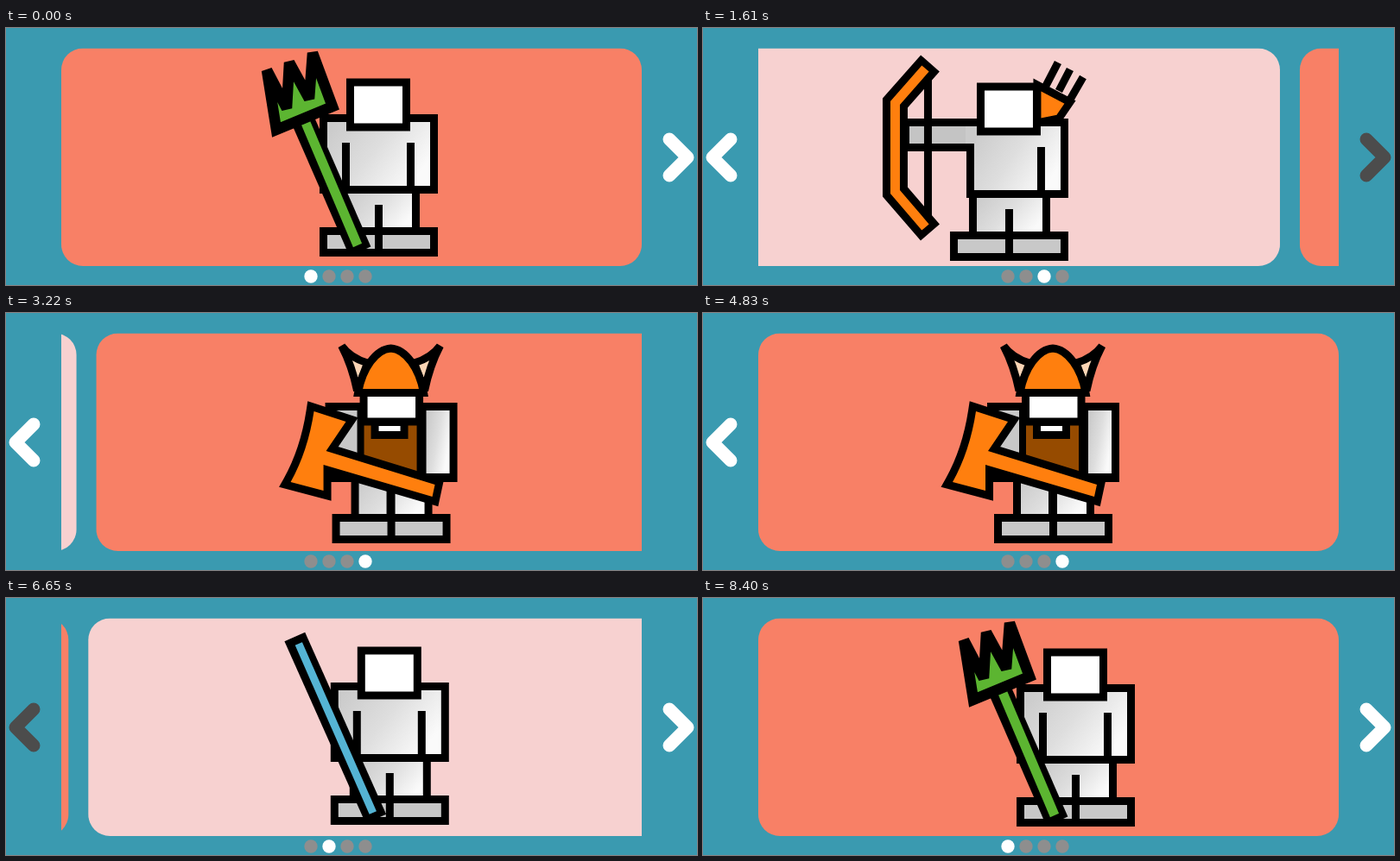
Recreate the animation shown at these times as an HTML page. Size 800 px wide and 298 px high, loop 8.47 s.

```html
<!DOCTYPE html>
<html lang="en">
<head>
<meta charset="utf-8">
<title>Character carousel</title>
<style>
  html, body { margin: 0; width: 100%; height: 100%; overflow: hidden; background: #3a9ab0; }
  svg { display: block; width: 800px; height: 298px; }
  .ink { fill: none; stroke: #000; stroke-width: 9; }
  .skin { fill: url(#steel); stroke: #000; stroke-width: 9; }
  .white { fill: #fff; stroke: #000; stroke-width: 9; }
  .arrow { fill: none; stroke-width: 15; stroke-linecap: round; stroke-linejoin: round; }
</style>
</head>
<body>
<svg viewBox="0 0 800 298">
  <defs>
    <linearGradient id="steel" x2="1" y2=".5">
      <stop offset=".1" stop-color="#cbcbcb"/>
      <stop offset=".55" stop-color="#dedede"/>
      <stop offset="1" stop-color="#fafafa"/>
    </linearGradient>
    <clipPath id="view"><path d="M64 23.500H736V276H64Z"/></clipPath>
    <g id="legs">
      <path class="skin" d="M389.5 187.5H474.5V236H389.5Z"/>
      <path d="M367.5 235.5H495.5V260.5H367.5Z" fill="#c8c8c8" stroke="#000" stroke-width="9"/>
      <path class="ink" d="M431.5 205V260"/>
    </g>
    <path id="head" class="white" d="M398.5 63H463.5V115H398.5Z"/>
    <g id="body">
      <use href="#legs"/>
      <path class="skin" d="M367.5 104.5H495.5V187.5H367.5Z"/>
      <path class="ink" d="M393.5 133V187M468.5 133V187"/>
      <use href="#head"/>
    </g>
    <path id="horn" d="M348 38Q358 52 378 58L366 90Q360 61 348 38Z"
          fill="#fbd5b5" stroke="#000" stroke-width="9" stroke-linejoin="bevel"/>
  </defs>

  <g clip-path="url(#view)">
    <g class="slide">
      <use href="#body"/>
      <path d="M342 103L410 259" stroke="#000" stroke-width="27"/>
      <path d="M347 110L407 252" stroke="#5cb531" stroke-width="11"/>
      <path d="M302 49L313 118L378 91L355 29L351 82L328 40L325 93Z"
            fill="#5cb531" stroke="#000" stroke-width="12.500" stroke-miterlimit="2"/>
    </g>

    <g class="slide">
      <path class="ink" d="M465 67L479 40M480 73L493 48M493 83L508 57"/>
      <path d="M455 66L493 86L480 105L455 110Z" fill="#ff7f0e" stroke="#000" stroke-width="9"/>
      <use href="#legs" x="-9" y="5"/>
      <path d="M302.5 109.5H400V138.5H302.5Z" fill="#c4c4c4" stroke="#000" stroke-width="9"/>
      <path class="skin" d="M377.5 109.5H486.5V192.5H377.5Z"/>
      <path d="M372 114H384V134H372Z" fill="#cbcbcb"/>
      <path class="ink" d="M459.5 138V192"/>
      <use href="#head" x="-9" y="5"/>
      <path class="ink" d="M328.5 52V228"/>
      <path d="M331 41L290.500 87V190L331 237" fill="none" stroke="#000" stroke-width="29"/>
      <path d="M325.500 47L290.500 87V190L325.500 231" fill="none" stroke="#ff7f0e" stroke-width="11"/>
    </g>

    <g class="slide">
      <use href="#body" x="-18.500" y="-2"/>
      <path d="M303 45L397 256" stroke="#000" stroke-width="26"/>
      <path d="M307.500 53L393.500 249" stroke="#55b4d4" stroke-width="9"/>
    </g>

    <g class="slide">
      <use href="#legs" x="-26" y="2"/>
      <path class="ink" d="M404.500 190V240"/>
      <path d="M329 104H482V196H329Z"/>
      <path d="M338 113H366V165H338Z" fill="#c8c8c8"/>
      <path d="M446 113H473V186H446Z" fill="url(#steel)"/>
      <path d="M374 130H435V187H374Z" fill="#964b00"/>
      <path d="M382 122H425V146H382Z"/>
      <path d="M391 131H416V137H391Z" fill="#fff"/>
      <path class="white" d="M373.500 92.500H438V126H373.500Z"/>
      <use href="#horn"/>
      <use href="#horn" transform="matrix(-1 0 0 1 810 0)"/>
      <path d="M367 92.500C372 64 388 42 405 41C422 42 438 64 443 92.500Z"
            fill="#ff7f0e" stroke="#000" stroke-width="9"/>
      <path d="M316 114L353 126L330 160L456 199L453 213L327 176V206L289 196Q309 160 316 114Z"
            fill="#ff7f0e" stroke="#000" stroke-width="18" paint-order="stroke"/>
    </g>
  </g>

  <path id="prev" class="arrow" d="M32 129L11 150L32 171"/>
  <path id="next" class="arrow" d="M768 129L789 150L768 171"/>
  <g id="dots"></g>
</svg>
<script>
  const LOOP = 8470, PITCH = 695, SLIDE_MS = 500;
  // [click time, slide shown afterwards]
  const clicks = [[560, 1], [1560, 2], [2870, 3], [5741.5, 2], [6620, 1], [7480, 0]];
  const NS = "http://www.w3.org/2000/svg";
  const $ = id => document.getElementById(id);

  function make(tag, attrs) {
    const el = document.createElementNS(NS, tag);
    for (const k in attrs) el.setAttribute(k, attrs[k]);
    return el;
  }

  const slides = [...document.querySelectorAll(".slide")];
  const cards = slides.map(g => {
    const card = make("rect", { x: 64, y: 23.5, width: 672, height: 252.5, rx: 25 });
    g.prepend(card);
    return card;
  });
  const dots = slides.map((_, i) =>
    $("dots").appendChild(make("circle", { cx: 353 + 21 * i, cy: 288, r: 7.7 })));

  // cubic-bezier(.25, .1, .25, 1), solved by bisection
  function ease(x) {
    if (x >= 1) return 1;
    const bez = (a, b, u) => 3 * a * u * (1 - u) ** 2 + 3 * b * u * u * (1 - u) + u ** 3;
    let lo = 0, hi = 1;
    for (let i = 0; i < 20; i++) {
      const mid = (lo + hi) / 2;
      if (bez(.25, .25, mid) < x) lo = mid; else hi = mid;
    }
    return bez(.1, 1, lo);
  }

  function draw(t) {
    let active = 0, pos = 0, pressed = 0;
    for (const [at, to] of clicks) {
      const dir = at < 4000 ? 1 : -1;
      if (t > at - 90 && t < at + 90) pressed = dir;
      if (t < at) break;
      pos = to - dir * (1 - ease((t - at) / SLIDE_MS));
      active = to;
    }
    slides.forEach((g, i) => {
      g.setAttribute("transform", `translate(${(i - pos) * PITCH} 0)`);
      cards[i].setAttribute("fill", i === active ? "#f88066" : "#f7d1d0");
      dots[i].setAttribute("fill", i === active ? "#fff" : "#8e8e8e");
    });
    const arrow = (id, shown, down) => {
      $(id).setAttribute("stroke", !shown ? "none" : down ? "#4c4c4c" : "#fff");
    };
    arrow("prev", active > 0, pressed < 0);
    arrow("next", active < 3, pressed > 0);
  }

  const start = performance.now();
  function tick() {
    draw((performance.now() - start) % LOOP);
    requestAnimationFrame(tick);
  }
  tick();
</script>
</body>
</html>
```
